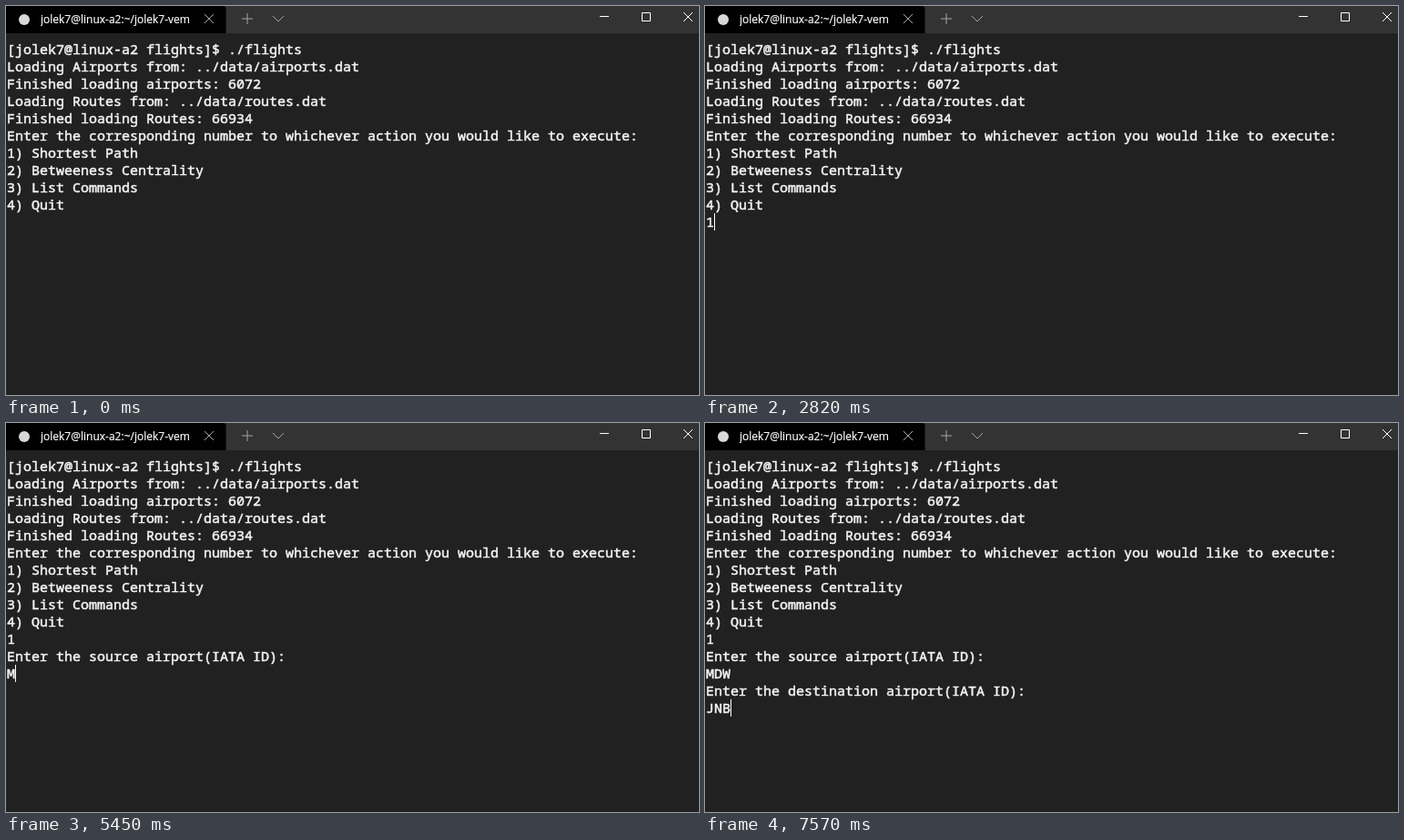
Write an HTML page that moves like this. It is 761 by 428 pixels and loops after 8000 ms.

```html
<!DOCTYPE html>
<html lang="en">
<head>
<meta charset="utf-8">
<title>Terminal</title>
<style>
  html, body { margin: 0; width: 100%; height: 100%; overflow: hidden; background: #212121; }
  svg { display: block; width: 761px; height: 428px; }
  .term {
    font: 500 15px "Noto Sans Mono", "DejaVu Sans Mono", monospace;
    fill: #f5f5f5; stroke: #f5f5f5; stroke-width: .5px;
    font-variant-ligatures: none;
  }
  .title { font: 12px "Open Sans", "Noto Sans", sans-serif; fill: #fff; stroke: #fff; stroke-width: .2px; }
  .icon { fill: none; stroke: #fff; }
  .dim { stroke: #a6a6a6; }
</style>
</head>
<body>
<svg viewBox="0 0 761 428">
  <clipPath id="tabClip"><rect x="38" y="0" width="168" height="30"/></clipPath>

  <rect width="761" height="428" fill="#212121"/>
  <rect width="761" height="30" fill="#333"/>
  <path d="M0 0H238.5Q241.5 0 241.5 3V30H0Z" fill="#000"/>
  <circle cx="20" cy="15" r="6" fill="#d8d8d8"/>
  <text class="title" x="38" y="19" clip-path="url(#tabClip)">jolek7@linux-a2:~/jolek7-vem</text>
  <path class="icon dim" d="M218 9l10 10m0-10l-10 10M259 14h12m-6-6v12M293 11l6 6 6-6"/>
  <path class="icon" d="M652 11.5h10M698.5 7.5h9v9h-9zM744 7l10 10m0-10l-10 10"/>

  <g id="lines" class="term"></g>
  <rect id="caret" width="1" height="19" fill="#fff"/>
  <circle id="click" cx="607" cy="384" r="12" fill="#8a8712"/>
  <path id="arrow" d="M.5 .5V15.5L4 12.3 6.4 17.6 8.8 16.6 6.5 11.4H11Z" fill="#fff" stroke="#000" stroke-width=".7"/>
</svg>
<script>
  const LOOP = 8000, LEFT = 1, TOP = 38, CELL = 9, ROW = 19;

  const intro = [
    "[jolek7@linux-a2 flights]$ ./flights",
    "Loading Airports from: ../data/airports.dat",
    "Finished loading airports: 6072",
    "Loading Routes from: ../data/routes.dat",
    "Finished loading Routes: 66934",
    "Enter the corresponding number to whichever action you would like to execute:",
    "1) Shortest Path",
    "2) Betweeness Centrality",
    "3) List Commands",
    "4) Quit"
  ];
  const askFrom = "1\nEnter the source airport(IATA ID):\n";
  const askTo = askFrom + "MDW\nEnter the destination airport(IATA ID):\n";

  // [start ms, session text, caret visible]
  const session = [
    [0, "", false],
    [1120, "", true],
    [1620, "", false],
    [2220, "", true],
    [2720, "", false],
    [2820, "1", true],
    [3040, askFrom, true],
    [3640, askFrom, false],
    [4240, askFrom, true],
    [5450, askFrom + "M", true],
    [5550, askFrom + "MD", true],
    [5950, askFrom + "MDW", true],
    [6570, askTo, true],
    [7170, askTo + "J", true],
    [7370, askTo + "JN", true],
    [7570, askTo + "JNB", true]
  ];

  // [start ms, tip position or null, click highlight]
  const pointer = [
    [0, null, false],
    [200, [684, 415], false],
    [300, [640, 398], false],
    [400, [607, 384], false],
    [1020, [607, 384], true],
    [1120, [607, 384], false],
    [1520, [673, 406], false],
    [1620, null, false]
  ];

  const byId = id => document.getElementById(id);
  const lines = byId("lines"), caret = byId("caret"), click = byId("click"), arrow = byId("arrow");
  const at = (steps, t) => steps.findLast(step => step[0] <= t);
  const show = (el, on) => el.setAttribute("visibility", on ? "visible" : "hidden");

  const rows = Array.from({ length: intro.length + 5 }, (_, i) => {
    const row = document.createElementNS("http://www.w3.org/2000/svg", "text");
    row.setAttribute("x", LEFT);
    row.setAttribute("y", TOP + i * ROW + 15);
    row.textContent = intro[i] || "";
    return lines.appendChild(row);
  });

  function draw(t) {
    const [, text, caretOn] = at(session, t);
    const typed = text.split("\n");
    rows.slice(intro.length).forEach((row, i) => {
      const value = typed[i] || "";
      if (row.textContent !== value) row.textContent = value;
    });
    caret.setAttribute("x", LEFT + typed.at(-1).length * CELL);
    caret.setAttribute("y", TOP + (intro.length + typed.length - 1) * ROW);
    show(caret, caretOn);

    const [, tip, pressed] = at(pointer, t);
    if (tip) arrow.setAttribute("transform", `translate(${tip})`);
    show(arrow, tip);
    show(click, pressed);
  }

  const start = performance.now();
  function tick() {
    draw((performance.now() - start) % LOOP);
    requestAnimationFrame(tick);
  }
  tick();
</script>
</body>
</html>
```
